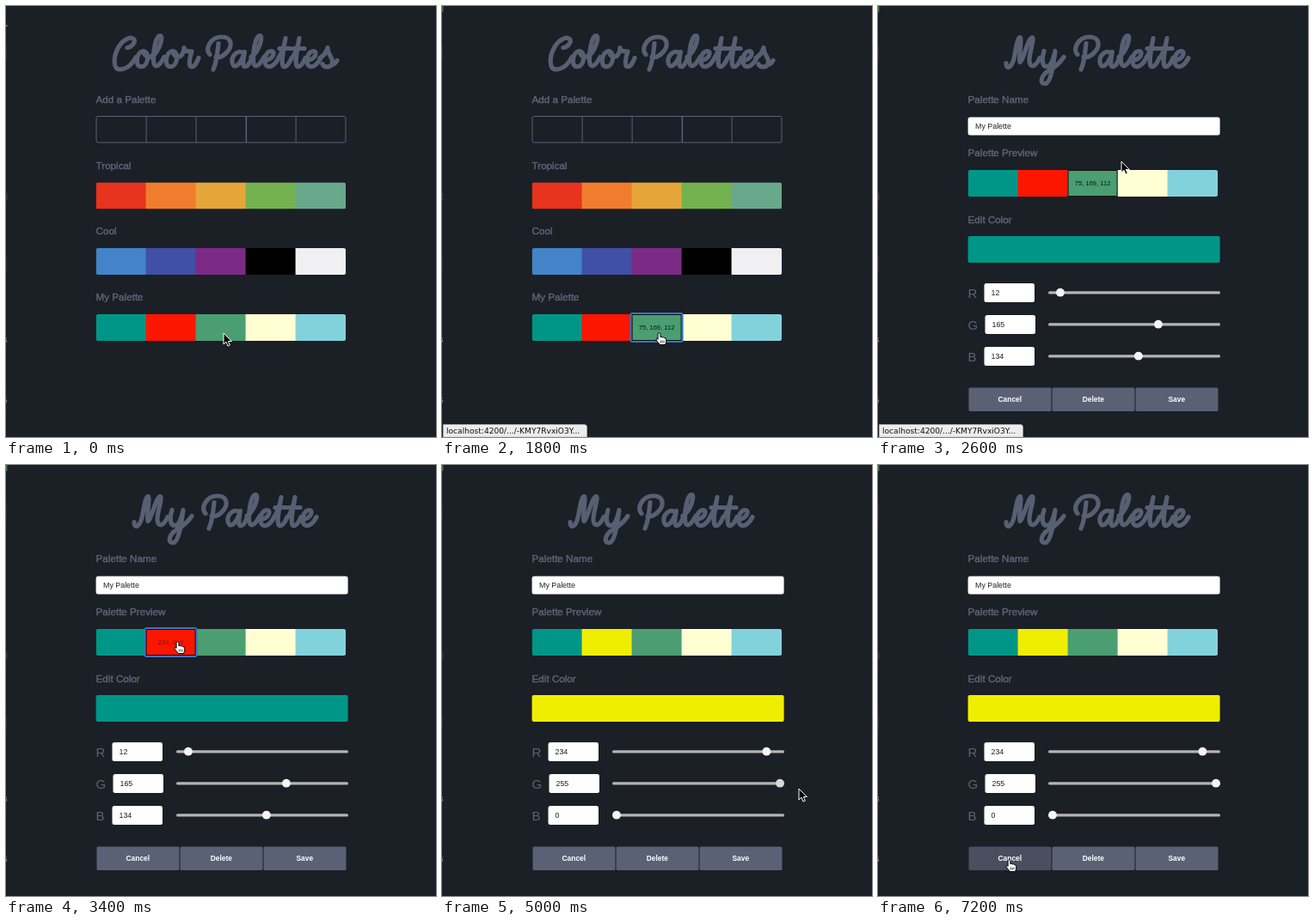
Recreate the animation shown at these times as an HTML page. Size 500 by 502 pixels, loop 8000 ms.

```html
<!DOCTYPE html>
<html lang="en">
<head>
<meta charset="utf-8">
<title>Color Palettes</title>
<style>
  html, body { margin: 0; width: 100%; height: 100%; overflow: hidden; background: #1b1f26; }
  svg { display: block; width: 100%; height: 100%; font-family: "Liberation Sans", Arial, sans-serif; }
  .label { font-size: 11.65px; fill: #5c6376; stroke: #5c6376; stroke-width: .45; }
  .channel { font-size: 15px; fill: #5c6376; }
  .value { font-size: 8.9px; fill: #222; }
  .rgb { font-size: 7.6px; fill: #0c1512; text-anchor: middle; }
  .button { font-size: 8.4px; font-weight: bold; fill: #fff; text-anchor: middle; }
  .status { font: 9.1px "DejaVu Sans", sans-serif; fill: #111; }
  .script { fill: none; stroke: #575f73; stroke-width: 5.2; stroke-linecap: round; stroke-linejoin: round; }
</style>
</head>
<body>
<svg id="stage" viewBox="0 0 500 502">
  <rect width="500" height="502" fill="#1b1f26"/>
  <g id="edge" fill="#4b4e56">
    <rect id="mark" width="1.5"/>
    <rect y="47" width="1" height="16" fill="#2c2f38"/>
    <rect y="218" width="1.5" height="8" fill="#343741"/>
    <rect y="293" width="1" height="15" fill="#2c2f38"/>
    <text x="-3.5" y="392" font-size="10" fill="#999">s</text>
    <text x="-3.5" y="462" font-size="10" fill="#999">s</text>
  </g>
  <g id="list"></g>
  <g id="edit"></g>
  <g id="status">
    <path d="M1.5 502V487.5H165.5Q168.5 487.5 168.5 490.5V502Z" fill="#ececec" stroke="#bbb" stroke-width=".6"/>
    <text class="status" x="5" y="498">localhost:4200/.../-KMY7RvxiO3Y...</text>
  </g>
  <g id="arrow">
    <path d="M0 0V13L3 10.2L5 15L7.3 14L5.3 9.5H9.3Z" fill="#000" stroke="#fff" stroke-width="1"/>
  </g>
  <g id="hand">
    <path d="M-1.4 7V1.2Q-1.2-.2 0-.2T1.4 1.2V4.6Q2.8 3.7 3.9 5Q5.3 4.4 6.2 5.7Q8.2 5.3 8.2 7.5V10Q8 11.5 7 13.6H.8Q-.4 11.6-2.6 9.2Q-4.2 7-3 6.5Q-2.2 6.4-1.4 7.4Z" fill="#fff" stroke="#000" stroke-width="1"/>
    <path d="M1.8 8.5V11.5M3.7 8.5V11.5M5.6 8.5V11.5" stroke="#000" stroke-width=".7"/>
  </g>
</svg>
<script>
const LOOP = 8000, STEP = 200;
const $ = id => document.getElementById(id);

function add(parent, tag, attrs, text) {
  const el = document.createElementNS("http://www.w3.org/2000/svg", tag);
  set(el, attrs);
  if (text !== undefined) el.textContent = text;
  parent.appendChild(el);
  return el;
}
const set = (el, attrs) => { for (const k in attrs) el.setAttribute(k, attrs[k]); };
const show = (el, on) => { el.style.display = on ? "" : "none"; };
const box = (parent, x, y, width, height, fill, rx = 0) =>
  add(parent, "rect", { x, y, width, height, fill, rx });
const write = (parent, cls, x, y, text) => add(parent, "text", { class: cls, x, y }, text);

// Script lettering: pen strokes on a baseline at y = 0
const pen = {
  C: "M18-25C22-25 28-31 26-34.5C22-39 12-34 7-24C2-14 1 0 9.5 .3C18 .3 25-7 28-14",
  o: "M11-21C3-21 0-2.8 8-2.8C16-2.8 19-19 11-21C12-15 17-12 21-16",
  l: "M1-14C10-20 16-39 11-39C6-39 3-20 3.5-10C4-1 9-1 16-14",
  r: "M1-15C4-18 5-23 5-25C6-20 9-21 14-20.5C11-12 10-2.8 14-2.8C18-2.8 20-8 22-13",
  P: "M5-17C-1-24 6-37 18-37.5C31-38 31-27 26-21C22-16 17-13 12-14M15-30C14-20 13-8 9 .5",
  a: "M17-18C9-25 2-14 3-8C4 0 12-2 17.5-20C15-8 15-2.8 18.5-2.8C21-2.8 24-8 26-14",
  e: "M1-10C13-10 16-21 10.5-21C5-21 2-13 3-8C4 0 13-1 19-13",
  t: "M1-13C5-20 8-29 9-36C6-20 3-2.8 7.5-2.8C11-2.8 14-8 16-13M2-24H15",
  s: "M0-13C5-16 8-21 9-25C9-16 17-12 14-6C12-1 4-2 3-6M14-5C16-5 18-7 20-10",
  M: "M3-7C3 1 9-1 12-12C14-21 16-37 19-37C22-37 17-14 19-8C22-8 29-37 33-37C37-37 29-17 30-9C31-1 37-2 42-13",
  y: "M5-21C2-11 3-3 8-3C13-3 16-12 18-21C16-6 13 17 6 17C-1 17 2 6 12 1C19-3 24-8 28-14"
};
function lettering(parent, text, places) {
  [...text].forEach((ch, i) =>
    add(parent, "path", { class: "script", d: pen[ch], transform: `translate(${places[i]} 73.5)` }));
}

const tropical = ["#e8331e", "#f27c2d", "#e6a538", "#73b24e", "#69a88a"];
const cool = ["#4284c7", "#3f50a6", "#7b2a86", "#000", "#f0eff1"];
const mine = ["#009687", "#fc1600", "#4a9e72", "#ffffd3", "#82d2dc"];
const X = 104.6, CELL = 58;

function palette(parent, y, colors) {
  const id = "clip" + y;
  const clip = add(parent, "clipPath", { id });
  box(clip, X, y, 290.5, 31, "#fff", 2.5);
  const g = add(parent, "g", { "clip-path": `url(#${id})` });
  return colors.map((c, i) => box(g, X + i * CELL, y, CELL + .5, 31, c));
}

function hoverCell(parent, index, y, text) {
  const g = add(parent, "g", {}), x = X + index * CELL;
  const ring = add(g, "rect", { x: x - 1, y: y - 1, width: CELL + 2, height: 33, rx: 2,
    fill: "none", stroke: "#3576c4", "stroke-width": 2 });
  add(g, "rect", { x: x + .5, y: y + .5, width: CELL - 1, height: 30, fill: "none", stroke: "#111" });
  const label = write(g, "rgb", x + CELL / 2, y + 17.5, text);
  return { g, ring, label };
}

// List page
const list = $("list"), edit = $("edit");
lettering(list, "ColorPalettes", [123, 149, 168, 183, 202, 232, 260, 284, 298, 316, 332, 347, 365]);
write(list, "label", X, 113, "Add a Palette");
add(list, "rect", { x: 105, y: 128.5, width: 290, height: 30.5, rx: 2, fill: "none", stroke: "#5a6076" });
for (let i = 1; i < 5; i++) box(list, X + i * CELL, 128, i === 3 ? 1.5 : 1, 31, "#5a6076");
[["Tropical", 205.4, tropical], ["Cool", 282, cool], ["My Palette", 359, mine]].forEach(([name, y, colors]) => {
  write(list, "label", X, y - 15.7, name);
  palette(list, y, colors);
});
const picked = hoverCell(list, 2, 359, "75, 169, 112");

// Edit page
lettering(edit, "MyPalette", [146, 188, 227, 255, 279, 293, 311, 327, 342]);
write(edit, "label", X, 113, "Palette Name");
box(edit, X, 129.5, 293, 21, "#fff", 2.5);
write(edit, "value", 113, 143, "My Palette");
write(edit, "label", X, 175, "Palette Preview");
const cells = palette(edit, 191, mine);
const green = hoverCell(edit, 2, 191, "75, 169, 112");
const red = hoverCell(edit, 1, 191, "234, 0, 0");
write(edit, "label", X, 252.5, "Edit Color");
const swatch = box(edit, X, 268, 293, 31, mine[0], 2);

const sliders = ["R", "G", "B"].map((name, i) => {
  const y = 334 + i * 37, dx = i === 1 ? 1 : 0;
  write(edit, "channel", X, y + 6.3, name);
  box(edit, 123.5 + dx, y - 11, 58.5, 22, "#fff", 2.5);
  const value = write(edit, "value", 131.5 + dx, y + 3.2, "");
  box(edit, 198, y - 1.8, 200, 3.2, "#b4b4b4", 1.5);
  const knob = add(edit, "circle", { cy: y - .3, r: 4.9, fill: "#f5f5f5" });
  return { value, knob };
});
const buttons = ["Cancel", "Delete", "Save"].map((name, i) => ({
  face: box(edit, 105.5 + i * 97, 444.5, 96, 27.5, "#5a6175", 1.5),
  text: write(edit, "button", 153.3 + i * 97, 461.3, name)
}));

// Pointer stops: time, x, y
const stops = [
  [0, 253, 381], [400, 252.5, 381], [2000, 252.5, 381], [2400, 264, 207], [2600, 283, 181],
  [2800, 280, 184], [3200, 204, 205], [3400, 199.5, 206], [3600, 199.5, 206], [4000, 213, 283],
  [4200, 203, 367], [4400, 250, 368], [4800, 385, 372], [5000, 415, 377], [5400, 424, 379],
  [6200, 424, 381], [6600, 320, 420], [7000, 165, 455], [7200, 152.5, 460], [8000, 152.5, 460]
];
function pointer(t) {
  const i = Math.max(1, stops.findIndex(s => s[0] > t));
  const a = stops[i - 1], b = stops[i], k = (t - a[0]) / (b[0] - a[0]);
  return [a[1] + (b[1] - a[1]) * k, a[2] + (b[2] - a[2]) * k];
}
const within = (t, a, b) => t >= a && t < b;

function draw(t) {
  const editing = t >= 2000;
  show(list, !editing);
  show(edit, editing);
  show($("status"), within(t, 400, 2800));
  set($("mark"), t < 400 ? { y: 22, height: 2, fill: "#a98a2c" } : { y: 0, height: 7, fill: "#3f7a3a" });

  show(picked.g, t >= 400);
  show(picked.ring, t >= 1600);
  show(green.g, within(t, 2400, 2800));
  show(green.ring, false);
  show(red.g, within(t, 3200, 4200));
  show(red.ring, t >= 3400);
  set(red.label, { opacity: t < 3600 ? .5 : .75 });

  const [x, y] = pointer(t);
  const chosen = t >= 3600;
  const g = t < 4200 ? 0 : t >= 5000 ? 255 : Math.round(Math.max(0, Math.min(1, (x - 203) / 190)) * 255);
  const k = g / 255;
  const mixed = `rgb(${252 - 12 * k},${22 + 216 * k},0)`;
  set(swatch, { fill: chosen ? mixed : mine[0] });
  set(cells[1], { fill: mixed });
  (chosen ? [234, g, 0] : [12, 165, 134]).forEach((v, i) => {
    sliders[i].value.textContent = v;
    set(sliders[i].knob, { cx: 203 + v / 255 * 190 });
  });
  set(sliders[1].knob, { fill: within(t, 4200, 5200) ? "#d8d8d8" : "#f5f5f5" });

  const over = t >= 7000;
  set(buttons[0].face, { fill: over ? "#494f60" : "#5a6175" });
  set(buttons[0].text, { fill: over ? "#c6c8ce" : "#fff" });

  const hand = within(t, 400, 2200) || t === 2400 || within(t, 3200, 4200) || over;
  show($("hand"), hand);
  show($("arrow"), !hand);
  set(hand ? $("hand") : $("arrow"), { transform: `translate(${x} ${y})` });
}

const start = performance.now();
function tick(now) {
  const t = Math.max(0, now - start) % LOOP;
  draw(Math.floor(t / STEP) * STEP);
  requestAnimationFrame(tick);
}
draw(0);
requestAnimationFrame(tick);
</script>
</body>
</html>
```
